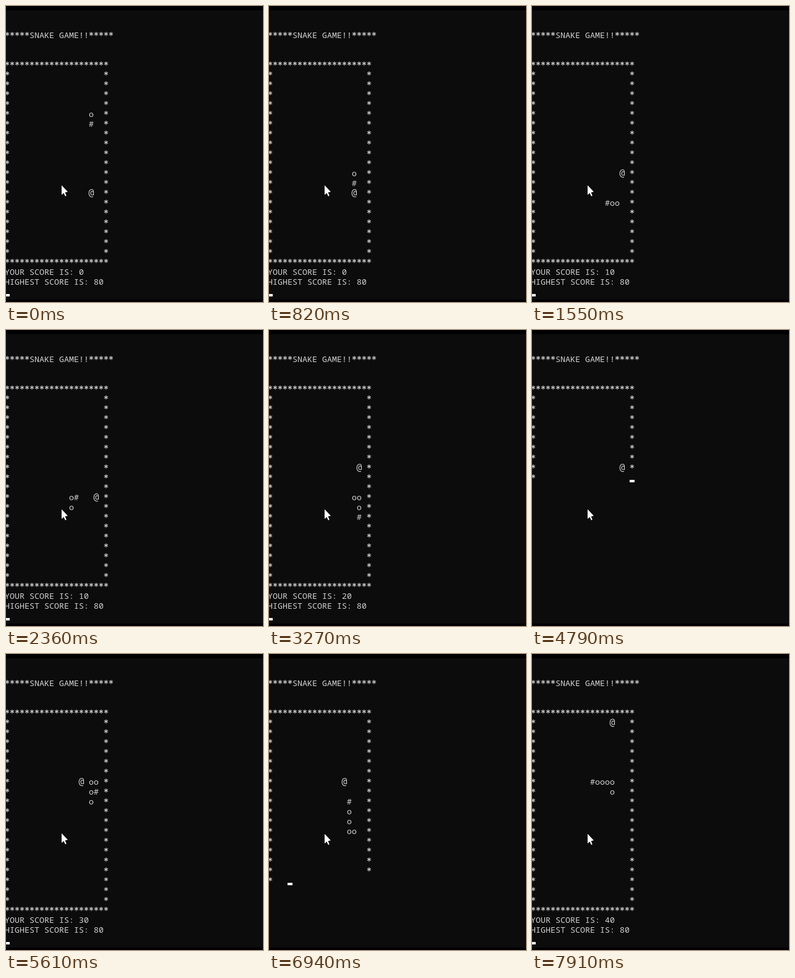
An HTML page with a canvas for the animation above (8000 ms loop, 416 by 480 pixels).

```html
<!DOCTYPE html>
<html lang="en">
<head>
<meta charset="utf-8">
<title>Snake game</title>
<style>
  html, body { margin: 0; width: 100%; height: 100%; overflow: hidden; background: #0c0c0c; }
  canvas { display: block; }
</style>
</head>
<body>
<canvas id="stage" width="416" height="480"></canvas>
<script>
const ctx = document.getElementById('stage').getContext('2d');
const LOOP = 8000;
const COLS = 22, LINES = 26, LEFT = -2, CELL_W = 8, CELL_H = 16, BASELINE = 52;
const BOARD = 21;         // walls included
const STEP = 153.5, FIRST_STEP = 38.5, REDRAW = 20;

const MONO = '"Noto Sans Mono", "DejaVu Sans Mono", monospace';
const ROUND_MONO = '"DejaVu Sans Mono", monospace';
const TEXT_FONT = `13.33px ${MONO}`;
const SYMBOL_FONTS = { '*': `bold 13.33px ${ROUND_MONO}`, '@': `15px ${ROUND_MONO}` };

// The head's path, one cell per move, starting with the tail cell and the head cell.
const DIRS = { U: [0, -1], D: [0, 1], L: [-1, 0], R: [1, 0] };
const path = [[17, 5], [17, 6]];
for (const [, dir, count] of 'D8 L4 U3 R5 D5 L1 U9 R1 D5 L2 U5 L4'.matchAll(/([UDLR])(\d)/g)) {
  for (let i = 0; i < +count; i++) {
    const [x, y] = path[path.length - 1];
    path.push([x + DIRS[dir][0], y + DIRS[dir][1]]);
  }
}
const LAST_MOVE = path.length - 2;

const FOOD = [[17, 13], [18, 11], [18, 8], [15, 7], [16, 1]];

function mealsBy(head) {
  let meals = 0;
  for (let i = 1; i <= head; i++) {
    if (path[i].join() === FOOD[meals].join()) meals++;
  }
  return meals;
}

function screenLines(move) {
  const head = move + 1;
  const meals = mealsBy(head);
  const wall = '*'.repeat(BOARD);
  const row = '*' + ' '.repeat(BOARD - 2) + '*';
  const board = Array.from({ length: BOARD }, (_, y) => [...(y % (BOARD - 1) ? row : wall)]);
  const put = ([x, y], ch) => { board[y][x] = ch; };

  put(FOOD[meals], '@');
  for (let i = 1; i <= meals + 1; i++) put(path[head - i], 'o');
  put(path[head], '#');

  return ['*****SNAKE GAME!!*****', '', '', ...board.map(cells => cells.join('')),
    `YOUR SCORE IS: ${meals * 10}`, 'HIGHEST SCORE IS: 80'];
}

function drawText(lines, limit) {
  ctx.fillStyle = '#d0d0d0';
  ctx.textAlign = 'center';
  ctx.textBaseline = 'alphabetic';
  lines.forEach((line, row) => {
    [...line].forEach((ch, col) => {
      if (ch === ' ' || row * COLS + col >= limit) return;
      ctx.font = SYMBOL_FONTS[ch] || TEXT_FONT;
      ctx.fillText(ch, LEFT + (col + 0.5) * CELL_W, BASELINE + row * CELL_H);
    });
  });
}

function drawCursor(position) {
  const row = Math.floor(position / COLS), col = position % COLS;
  ctx.fillStyle = '#f8f8f8';
  ctx.fillRect(LEFT + col * CELL_W, BASELINE - 1 + row * CELL_H, CELL_W, 4);
}

function drawPointer(x, y) {
  const points = [[0, 0], [0, 15.5], [3.5, 12.4], [5.9, 17.8], [7.8, 17], [5.6, 11.4], [10, 10.4]];
  ctx.fillStyle = '#ffffff';
  ctx.beginPath();
  points.forEach(([dx, dy]) => ctx.lineTo(x + dx, y + dy));
  ctx.fill();
}

function render(t) {
  // Each move clears the screen and reprints it, shown cut off for an instant.
  const steps = (t - FIRST_STEP + REDRAW) / STEP + 1;
  const move = Math.min(LAST_MOVE, Math.floor(steps));
  const redrawing = move > 0 && (steps - move) * STEP < REDRAW;
  const end = LINES * COLS;
  const printed = redrawing ? move * 134 % end : end;

  ctx.fillStyle = '#0c0c0c';
  ctx.fillRect(0, 0, 416, 480);
  ctx.fillStyle = '#000000';
  ctx.fillRect(0, 0, 416, 7);
  ctx.fillStyle = '#030003';
  ctx.fillRect(0, 476, 416, 4);

  drawText(screenLines(move), printed);
  drawCursor(printed);
  drawPointer(90, t < 6100 ? 290.8 : 291.8);
}

function tick() {
  render(performance.now() % LOOP);
  requestAnimationFrame(tick);
}
tick();
</script>
</body>
</html>
```
